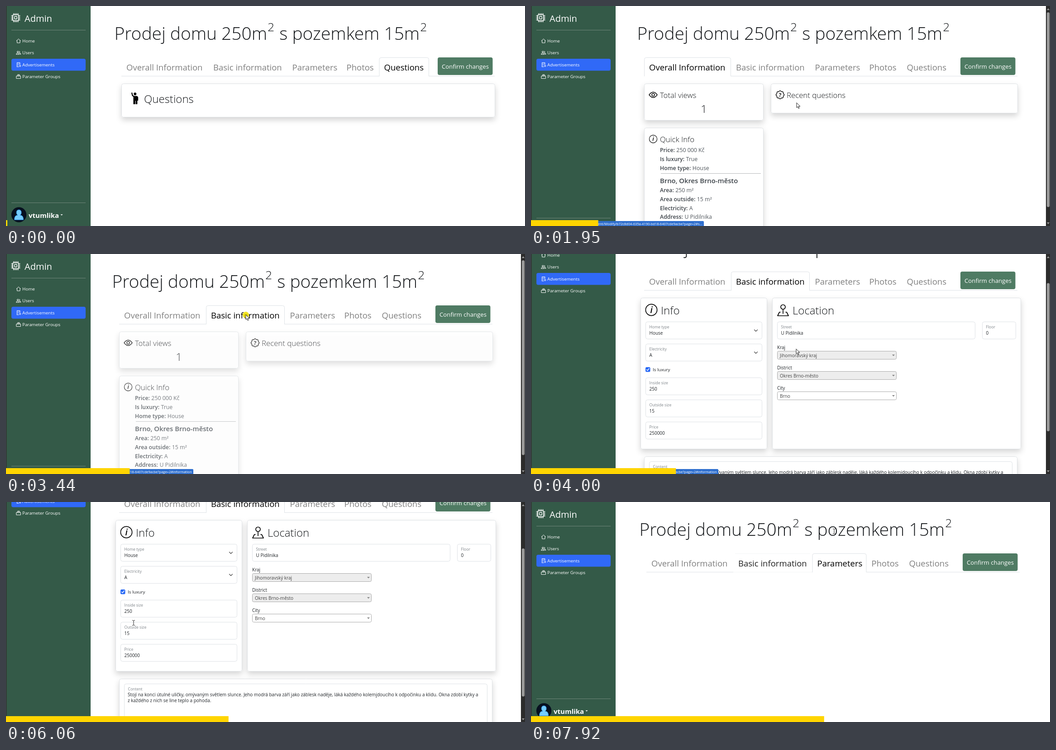
Recreate the animation shown at these times as an HTML page with a canvas. Size 1147 by 488 pixels, loop 7.99 s.

```html
<!DOCTYPE html>
<html lang="cs">
<head>
<meta charset="utf-8">
<title>Admin</title>
<style>
html, body { margin: 0; width: 100%; height: 100%; overflow: hidden; background: #fff; }
canvas { display: block; width: 1147px; height: 488px; }
</style>
</head>
<body>
<canvas id="stage" width="1147" height="488"></canvas>
<script>
const W = 1147, H = 488, LOOP = 7990;
const ctx = document.getElementById('stage').getContext('2d');
const FONT = '"Open Sans", "Noto Sans", sans-serif';
const THIN = '#14171a';

// Screen refreshes: [first, last, count], on a 10 ms clock
const ticks = [0];
for (const [a, b, n] of [[60, 110, 2], [260, 330, 2], [530, 1280, 13], [1340, 2130, 14],
  [2200, 2940, 13], [3000, 3740, 13], [3800, 4570, 13], [4630, 5380, 13],
  [5440, 6190, 13], [6250, 6980, 13], [7050, 7800, 13], [7860, 7920, 2]]) {
  for (let i = 0; i < n; i++) ticks.push(Math.floor((a + (b - a) * i / (n - 1)) / 10) * 10);
}

const pageHeight = { questions: 488, summary: 522, info: 686, params: 488 };
const scrollKeys = [[0, 0], [2250, 0], [2450, 34], [2740, 34], [2810, 14], [2900, 0],
  [3800, 0], [3990, 75], [4200, 132], [6600, 132], [7400, 0]];
// time, x, y
const pointerKeys = [[60, 640, 330], [110, 440, 251], [260, 400, 190], [330, 380, 168],
  [530, 360, 138], [1500, 350, 134], [1650, 390, 150], [1900, 585, 213], [1940, 587, 215],
  [2810, 610, 217], [3000, 600, 190], [3250, 530, 136], [3450, 530, 135], [3740, 580, 205],
  [3990, 586, 211], [4400, 560, 220], [4630, 515, 180], [4850, 400, 113], [5000, 400, 113],
  [5190, 321, 71], [5380, 345, 162], [5700, 345, 162], [5880, 300, 235], [6060, 282, 268],
  [6600, 400, 250], [7300, 600, 160], [7650, 680, 135], [7800, 680, 133], [7920, 670, 65]];
const clicks = [1500, 3400, 4860, 5170, 5600, 7780];

const between = (t, a, b) => t >= a && t < b;

function track(keys, t, col = 1) {
  let i = 0;
  while (i < keys.length - 1 && keys[i + 1][0] <= t) i++;
  const a = keys[i], b = keys[i + 1];
  if (!b || t <= a[0]) return a[col];
  return a[col] + (b[col] - a[col]) * (t - a[0]) / (b[0] - a[0]);
}

function text(s, x, y, size, color = '#212529', weight = 400, align = 'left') {
  ctx.font = `${weight} ${size}px ${FONT}`;
  ctx.fillStyle = color;
  ctx.textAlign = align;
  ctx.fillText(s, x, y);
  return ctx.measureText(s).width;
}

function rect(x, y, w, h, color) {
  ctx.fillStyle = color;
  ctx.fillRect(x, y, w, h);
}

function box(x, y, w, h, r, fill, stroke, line = 1) {
  ctx.beginPath();
  ctx.roundRect(x, y, w, h, r);
  if (fill) { ctx.fillStyle = fill; ctx.fill(); }
  if (stroke) { ctx.strokeStyle = stroke; ctx.lineWidth = line; ctx.stroke(); }
}

function disc(x, y, r, fill, stroke, line = 1) {
  box(x - r, y - r, 2 * r, 2 * r, r, fill, stroke, line);
}

function path(d, x, y, scale, stroke, line = 1, fill) {
  ctx.save();
  ctx.translate(x, y);
  ctx.scale(scale, scale);
  const p = new Path2D(d);
  if (fill) { ctx.fillStyle = fill; ctx.fill(p); }
  if (stroke) {
    ctx.strokeStyle = stroke;
    ctx.lineWidth = line / scale;
    ctx.lineJoin = ctx.lineCap = 'round';
    ctx.stroke(p);
  }
  ctx.restore();
}

function card(x, y, w, h) {
  ctx.save();
  ctx.shadowColor = 'rgba(0,0,0,.17)';
  ctx.shadowBlur = 13;
  ctx.shadowOffsetY = 6;
  box(x, y, w, h, 4, '#fff');
  ctx.restore();
  box(x + .5, y + .5, w - 1, h - 1, 4, '#fff', '#dfe2e5');
}

function infoIcon(x, y, r) {
  disc(x, y, r, null, '#000', r / 7.5);
  text('i', x, y + r * .52, r * 1.5, '#000', 'italic 600', 'center');
}

function sidebar(height) {
  rect(0, 0, 187, height, '#345a48');
  rect(0, 0, 1.5, height, '#333');
  // Chip
  box(15, 19.5, 13, 13, 2, null, '#fff', 1.7);
  box(18.8, 23.3, 5.4, 5.4, .5, null, '#fff', 1.4);
  for (let i = 0; i < 4; i++) {
    const d = 16.6 + i * 3.2;
    for (const e of [16, 33]) rect(d - .4, e, 1.4, 3, '#fff');
    for (const e of [11.5, 28.5]) rect(e, d + 4.1, 3, 1.4, '#fff');
  }
  text('Admin', 41, 35, 20, '#fff');
  rect(12, 53, 164, 1, '#6e8579');
  box(12, 117, 164, 26.5, 4, '#3069f7');
  ['Home', 'Users', 'Advertisements', 'Parameter Groups'].forEach((s, i) =>
    text(s, 36, 81 + i * 26.45, 9.8, '#fff'));
  path('M1 8 L8 1.5 L15 8 M3 7 V15 H13 V7', 22.5, 72, .65, '#fff');
  path('M3 5 a2.5 2.5 0 1 0 5 0 a2.5 2.5 0 1 0 -5 0 M0 13 Q0 9 5.5 9 Q10 9 10 13 Z ' +
    'M10 3 a2.4 2.4 0 1 1 0 5 M11 9.5 Q16 9 16 13 H12', 22.5, 98.5, .65, '#fff');
  path('M2 15 V1 H12 V7 M2 15 H8 M5 4 H6 M9 4 H9.5 M5 7 H6 M9 7 H9.5 M5 10 H6 ' +
    'M10 12 a2.5 2.5 0 1 0 5 0 a2.5 2.5 0 1 0 -5 0', 23, 125, .65, '#fff');
  path('M1 6 H15 V14 H1 Z M3 3.5 H13 M5 1 H11', 22.5, 151.5, .66, '#fff');

  rect(12, height - 52, 164, 1, '#6e8579');
  const y = height - 25;
  disc(28.5, y, 16.7, '#07101f');
  path('M-10 11 Q-10 1 -3 1 Q-6 -2 -5.5 -6 Q-4.5 -11 0 -11 Q4.5 -11 5.5 -6 Q6 -2 3 1 Q10 1 10 11 Z',
    28.5, y, 1, '#2585d8', 1, '#74ccff');
  text('vtumlika', 50, y + 6.5, 15, '#fff', 700);
  path('M0 0 H5 L2.5 2.7 Z', 120.5, y - 1, 1, null, 1, '#fff');
}

const tabs = [['Overall Information', 250, 192], ['Basic information', 442, 174],
  ['Parameters', 616.5, 120], ['Photos', 736.5, 83], ['Questions', 819.5, 110.5]];

function heading(x, y) {
  for (const part of ['Prodej domu 250m', ' s pozemkem 15m']) {
    x += text(part, x, y, 38.9, THIN, 300);
    x += text('2', x + 1, y - 19, 26.5, THIN, 300) + 2;
  }
}

function header(active, hover, leaving) {
  heading(234.5, 75);
  rect(250, 155, 825, 1, '#dee2e6');
  tabs.forEach(([name, x, w], i) => {
    const on = i === active;
    if (on || i === hover) {
      ctx.beginPath();
      ctx.moveTo(x + .5, 156);
      ctx.arcTo(x + .5, 114.5, x + 9, 114.5, 4);
      ctx.arcTo(x + w - .5, 114.5, x + w - .5, 156, 4);
      ctx.lineTo(x + w - .5, 156);
      ctx.fillStyle = '#fff';
      if (on) ctx.fill();
      ctx.strokeStyle = on ? '#dee2e6' : '#e9ecef';
      ctx.lineWidth = 1;
      ctx.stroke();
    }
    if (i === leaving) {
      rect(x + 4, 114, w - 8, 1, '#f4f5f6');
      rect(x, 155, w, 1, '#f4f5f6');
    }
    text(name, x + 11, 143, 18.5, on ? '#000' : i === leaving ? '#222' : '#808080');
  });
  box(949, 114, 121.5, 39, 4, '#4f7b63');
  text('Confirm changes', 958, 138.5, 13.2, '#fff');
}

function questions() {
  card(250, 172, 826, 75);
  // Person with a raised hand
  path('M273.2 193 L274.5 198.5 L278 201 H284.5 L286 203 V209', 0, 0, 1, '#000', 2.3);
  path('M277 200 H285 V217.5 H282 V210 H280.5 V217.5 H277 Z', 0, 0, 1, '#000', .6, '#000');
  disc(280.2, 195, 3, '#000');
  text('Questions', 300, 215, 24, THIN, 300);
}

function summary() {
  card(250, 172, 264, 82);
  path('M-9 0 Q0 -12 9 0 Q0 12 -9 0 Z', 270, 197, 1, '#000', 1.4);
  disc(270, 197, 3, null, '#000', 1.4);
  text('Total views', 285, 204, 16.8, THIN, 300);
  text('1', 382, 237, 24, THIN, 300, 'center');

  card(530, 172, 546, 66);
  let d = '';
  for (let i = 0; i <= 48; i++) {
    const a = i * Math.PI / 24, r = 8.4 + .7 * Math.cos(a * 8);
    d += `${i ? 'L' : 'M'}${r * Math.cos(a)} ${r * Math.sin(a)}`;
  }
  path(d, 550.5, 197, 1, '#000', 1.4);
  text('?', 550.5, 202, 13, '#000', 600, 'center');
  text('Recent questions', 565, 204, 16.8, THIN, 300);

  card(250, 270, 264, 236);
  infoIcon(270, 295, 8.6);
  text('Quick Info', 285, 302, 16.8, THIN, 300);
  const row = (label, value, y) => {
    const w = text(label, 285, y, 12.3, '#3d4349', 600);
    text(value, 285 + w + 3.5, y, 12.3, '#51575d');
  };
  row('Price:', '250 000 Kč', 324);
  row('Is luxury:', 'True', 344);
  row('Home type:', 'House', 364);
  rect(287, 371, 221, 1, '#b5b8ba');
  text('Brno, Okres Brno-město', 285, 392.5, 14.8, '#3d4349', 600);
  [['Area:', '250 m²'], ['Area outside:', '15 m²'], ['Electricity:', 'A'],
    ['Address:', 'U Pidilnika'], ['Floor:', '0']].forEach(([a, b], i) => row(a, b, 413 + i * 19.8));
}

function field(label, value, x, y, w, focus) {
  if (focus) box(x - 1, y - 1, w + 2, 41, 5, null, 'rgba(60,130,255,.35)', 4);
  box(x + .5, y + .5, w - 1, 38, 4, '#fff', focus ? '#86b7fe' : '#dee2e6');
  text(label, x + 8.5, y + 15, 8.6, '#7f858a');
  text(value, x + 8.5, y + 28.5, 10, '#212529');
}

function picker(label, value, y, fill) {
  text(label, 544, y, 10, '#212529');
  box(544.5, y + 4.5, 263, 18, 3, fill, '#aaa');
  text(value, 550, y + 17.5, 10, '#444');
  path('M0 0 H6 L3 3.4 Z', 798, y + 12, 1, null, 1, '#888');
}

function info(t) {
  card(242, 172, 280, 336);
  infoIcon(266, 199, 12.6);
  text('Info', 287, 209, 24, THIN, 300);
  field('Home type', 'House', 253, 225, 258, between(t, 4850, 5250));
  field('Electricity', 'A', 253, 274, 258, between(t, 5590, 5980));
  for (const y of [243, 292]) path('M0 0 L3.5 3.5 L7 0', 493.5, y, 1, '#444', 1.1);
  box(253, 326, 10.5, 10.5, 2.5, '#2869f5');
  path('M0 2.5 L2 4.5 L5.5 0', 255.5, 329, 1, '#fff', 1.4);
  text('Is luxury', 269, 335, 9.8, '#212529');
  field('Inside size', '250', 253, 349, 258);
  field('Outside size', '15', 253, 398, 258);
  field('Price', '250000', 253, 447, 258);

  card(533, 172, 550, 336);
  path('M-6 4 H-8 L-12 12 H12 L8 4 H6 M0 -2 V7', 557, 200, 1, '#000', 1.7);
  disc(557, 192.5, 5, null, '#000', 1.7);
  text('Location', 578, 209, 24, THIN, 300);
  field('Street', 'U Pidilnika', 544, 225, 438);
  field('Floor', '0', 997, 225, 75);
  picker('Kraj', 'Jihomoravský kraj', 286, '#ededed');
  picker('District', 'Okres Brno-město', 331, '#ededed');
  picker('City', 'Brno', 376, '#fff');

  card(250, 524, 825, 146);
  box(261.5, 535.5, 802, 120, 4, '#fff', '#dee2e6');
  text('Content', 269.5, 549.5, 8.6, '#7f858a');
  text('Stojí na konci útulné uličky, omývaným světlem slunce. Jeho modrá barva září jako záblesk ' +
    'naděje, láká každého kolemjdoucího k odpočinku a klidu. Okna zdobí kytky a', 269, 563, 10);
  text('z každého z nich se line teplo a pohoda.', 269, 576, 10);
}

function scrollbar(height, scroll) {
  rect(1138, 0, 9, H, '#2c2c2c');
  const k = 462 / height;
  box(1140, 14 + scroll * k, 6, H * k, 3, '#9b9b9b');
  path('M0 4 L3 0 L6 4 Z', 1140, 5, 1, null, 1, '#9b9b9b');
  path('M0 0 L3 4 L6 0 Z', 1140, 480, 1, null, 1, '#9b9b9b');
}

function status(t) {
  if (!between(t, 600, 4500)) return;
  const base = 'ent/Modify/b72c8d04-635a-4190-bd18-6407cde9acbe?page=2';
  const [hash, right] = t < 2100 ? ['#s...', 382] : t < 3200 ? ['#summary', 406] : ['#information', 414];
  box(-4, 477, right + 4, 15, 2, '#2f6fce');
  text(base + hash, right - 3.5, 486, 7.5, '#fff', 400, 'right');
}

function pointer(t) {
  if (t < 60) return;
  const x = track(pointerKeys, t), y = track(pointerKeys, t, 2);
  if (clicks.some(c => between(t, c, c + 130))) disc(x, y, 7, 'rgba(240,225,0,.85)');
  if (between(t, 5100, 5300) || between(t, 5950, 6400) || t > 7850) {
    path('M-2.5 -5.5 H-1 L0 -4.5 L1 -5.5 H2.5 M0 -4.5 V4.5 M-2.5 5.5 H-1 L0 4.5 L1 5.5 H2.5', x, y, 1, '#222', 1);
  } else {
    path('M0 0 V10.5 L2.4 8.3 L4.2 12.3 L6 11.5 L4.2 7.6 H7.4 Z', x, y, 1, '#222', 1, '#fff');
  }
}

// Tab panes cross-fade through white
function pane(t) {
  const steps = [['questions', -1e4, 1500], ['summary', 1500, 3400], ['info', 3400, 7780], ['params', 7780, 1e4]];
  const [name, from, to] = steps.find(s => between(t, s[1] + 125, s[2] + 125));
  const fade = Math.min((t - from - 125) / 150, 1 - (t - to) / 125);
  return [name, Math.max(0, Math.min(1, fade))];
}

function draw(time) {
  let n = ticks.length - 1;
  while (ticks[n] > time) n--;
  const t = ticks[n];
  const [name, alpha] = pane(t);
  const height = pageHeight[name], scroll = track(scrollKeys, t);
  const active = t < 1500 ? 4 : t < 3400 ? 0 : t < 7780 ? 1 : 2;
  const hover = between(t, 530, 1500) ? 0 : between(t, 3180, 3400) ? 1 : between(t, 7600, 7780) ? 2 : -1;

  rect(0, 0, W, H, '#fff');
  ctx.save();
  ctx.translate(0, -scroll);
  sidebar(height);
  if (height === H) ctx.translate(5, 0);
  header(active, hover, t >= 7780 ? 1 : -1);
  ctx.globalAlpha = alpha;
  if (name === 'questions') questions();
  if (name === 'summary') summary();
  if (name === 'info') info(t);
  ctx.restore();

  if (height > H) scrollbar(height, scroll);
  status(t);
  rect(0, 475, 3 + n * 5.2, 13, '#ffd500');
  pointer(t);
}

const start = performance.now();
function loop() {
  draw((performance.now() - start) % LOOP);
  requestAnimationFrame(loop);
}
loop();
</script>
</body>
</html>
```
